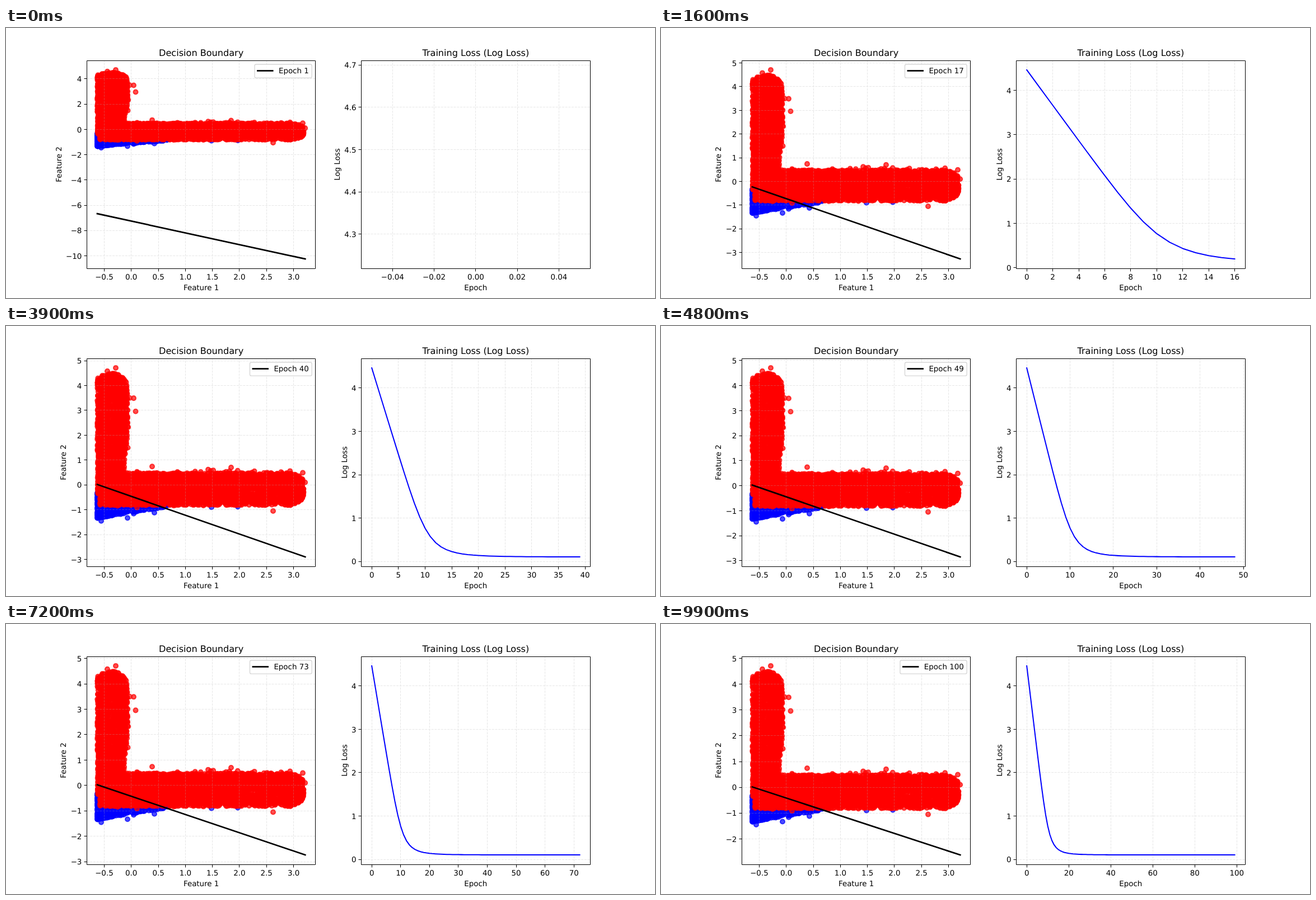
Recreate the animation shown at these times as an HTML page with a canvas. Size 1159 px wide and 483 px high, loop 10000 ms.

```html
<!DOCTYPE html>
<html lang="en">
<head>
<meta charset="utf-8">
<title>Decision boundary training</title>
<style>
  html, body { margin: 0; width: 100%; height: 100%; overflow: hidden; background: #fff; }
  canvas, svg { position: absolute; left: 0; top: 0; width: 1159px; height: 483px; }
  text { font-family: "DejaVu Sans", sans-serif; font-size: 13.417px; text-rendering: geometricPrecision; }
  .title { font-size: 16.1px; }
</style>
</head>
<body>
<canvas id="dots" width="1159" height="483"></canvas>
<svg id="plot" viewBox="0 0 1159 483"></svg>
<script>
const STEP = 100, EPOCHS = 100;
const PT = 1.3417, EM = 10 * PT;
const LEFT = 144.4, W = 408.5, TOP = 58, H = 372, BOTTOM = TOP + H;
const X_MIN = -0.629, X_MAX = 3.215, Y_MIN = -1.46, Y_MAX = 4.71;
const svg = document.getElementById('plot');
const ctx = document.getElementById('dots').getContext('2d');

// Descent at a constant rate that fades as the loss nears its floor
const LOSS_START = 4.465, LOSS_FLOOR = .102, RATE = .4, SUB = 10;
const losses = [LOSS_START];
for (let k = 1, loss = LOSS_START; k < EPOCHS; k++) {
  for (let i = 0; i < SUB; i++)
    loss -= RATE / SUB * (1 - Math.exp(-1.4 * (loss - LOSS_FLOOR) ** 1.3));
  losses.push(loss);
}

// Boundary y = offset + slope * x: a fast decay plus a slow drift
const decay = (k, tau) => Math.exp(-k / tau);
const offset = k => -.41 - 6.645 * decay(k, 4.6) - .2 * decay(k, 28);
const slope = k => -.805 + .0012 * k - .126 * decay(k, 5);

// Scatter points: stage x, data y
let seed = 20;
function rnd() {
  seed = (seed * 1664525 + 1013904223) % 4294967296;
  return seed / 4294967296;
}
const EDGE = 163.2;
const tail = size => rnd() < .06 ? size * rnd() : 0;

function makeBlue() {
  const pts = [[367, -.9], [414, -.88], [265, -1.12], [170, -1.45], [228, -1.16], [217, -1.33]];
  for (let i = 0; i < 900; i++) {
    const dx = 125 * rnd() ** 2.1;
    const low = -1.34 + .0037 * dx;
    pts.push([EDGE + dx, low + (-.3 - low) * rnd() ** 1.2]);
  }
  return pts;
}

function makeRed() {
  const pts = [[196, 4.71], [181, 4.58], [228, 3.49], [231.5, 2.96], [261, .74], [361, .62],
    [402, .7], [530, .49], [534.2, .1], [477, -1.05]];
  // upright arm
  for (let i = 0; i < 1700; i++) {
    const y = -.2 + 4.7 * rnd();
    const right = 217.5 - 1.3 * (y - 2.9) ** 2;
    const x = EDGE + (right - EDGE) * rnd() ** 1.1 + tail(8);
    if (y < 4.5 - .25 * ((x - 187) / 25) ** 2) pts.push([x, y]);
  }
  // level arm, tapered at its right end
  for (let i = 0; i < 3400; i++) {
    const x = EDGE + 368.5 * rnd();
    const t = Math.max(0, (x - 503) / 30);
    const s = 2 * rnd() - 1;
    const y = -.17 + (s * .65 + Math.sign(s) * tail(.13)) * (1 - .5 * t * t);
    if (y > -.3 - (x - EDGE) * .1) pts.push([x, y]);
  }
  return pts;
}
const clouds = [['#00f', makeBlue()], ['#f00', makeRed()]];

function drawDots(py) {
  ctx.clearRect(0, 0, 1159, 483);
  ctx.globalAlpha = .7;
  ctx.lineWidth = 1.5 * PT;
  for (const [color, pts] of clouds) {
    ctx.fillStyle = ctx.strokeStyle = color;
    for (const [x, y] of pts) {
      ctx.beginPath();
      ctx.arc(x, py(y), 3 * PT, 0, 7);
      ctx.fill();
      ctx.stroke();
    }
  }
}

const text = (x, y, s, anchor = 'middle', extra = '') =>
  `<text x="${x}" y="${y}" text-anchor="${anchor}" ${extra}>${s}</text>`;
const line = (d, color, width, extra = '') =>
  `<path d="${d}" fill="none" stroke="${color}" stroke-width="${width}" ${extra}/>`;
const snap = v => Math.floor(v) + .5;
const textWidth = s =>
  EM * [...s].reduce((w, c) => w + (c === '.' ? .318 : c === '−' ? .838 : .636), 0);

function ticks(lo, hi) {
  const raw = (hi - lo) / 9;
  const mag = 10 ** Math.floor(Math.log10(raw));
  const step = +([1, 2, 2.5, 5, 10].find(s => s * mag >= raw - 1e-9) * mag).toFixed(6);
  const digits = (String(step).split('.')[1] || '').length;
  const list = [];
  for (let i = Math.ceil(lo / step - 1e-9); i <= hi / step + 1e-9; i++) {
    const label = (i < 0 ? '−' : '') + Math.abs(i * step).toFixed(digits);
    list.push([i * step, label]);
  }
  return list;
}

const scale = (lo, hi, a, b) => v => a + (v - lo) / (hi - lo) * (b - a);
const pad = (lo, hi) => [lo - .05 * (hi - lo), hi + .05 * (hi - lo)];

function panel(left, xLim, yLim, title, xName, yName, content) {
  const px = scale(...xLim, left, left + W), py = scale(...yLim, BOTTOM, TOP);
  const x0 = snap(left), x1 = snap(left + W), y0 = snap(TOP), y1 = snap(BOTTOM);
  const mid = left + W / 2;
  let grid = '', marks = '', labels = '', wide = 0;
  for (const [v, s] of ticks(...xLim)) {
    const x = snap(px(v));
    grid += `M${x} ${y1}V${y0}`;
    marks += `M${x} ${y1}v5`;
    labels += text(px(v), 450.2, s);
  }
  for (const [v, s] of ticks(...yLim)) {
    const y = snap(py(v));
    grid += `M${x0} ${y}H${x1}`;
    marks += `M${x0} ${y}h-5`;
    labels += text(left - 9, py(v) + 5.2, s, 'end');
    wide = Math.max(wide, textWidth(s));
  }
  const yx = left - wide - 17.5, my = TOP + H / 2;
  return line(grid, '#b0b0b0', 1.07, 'stroke-opacity=".3" stroke-dasharray="3.97 1.72"')
    + content(px, py)
    + line(marks + `M${x0} ${y0}H${x1}V${y1}H${x0}Z`, '#000', 1)
    + labels
    + text(mid, 50, title, 'middle', 'class="title"')
    + text(mid, 468.7, xName)
    + text(0, 0, yName, 'middle', `transform="translate(${yx} ${my}) rotate(-90)"`);
}

function legend(epoch) {
  const w = EM * (3.381 + 3.6) + textWidth(String(epoch)), x = LEFT + W - 6.7 - w;
  return `<rect x="${x}" y="65" width="${w}" height="24.2" rx="2.7" fill="#fff"`
    + ` fill-opacity=".8" stroke="#ccc" stroke-opacity=".8" stroke-width="1.34"/>`
    + line(`M${x + .4 * EM} 76.5h${2 * EM}`, '#000', 2 * PT, 'stroke-linecap="square"')
    + text(x + 3.2 * EM, 80.6, 'Epoch ' + epoch, 'start');
}

function draw(k) {
  const boundaryY = x => offset(k) + slope(k) * x;
  const yLim = pad(Math.min(boundaryY(X_MAX), Y_MIN), Y_MAX);
  drawDots(scale(...yLim, BOTTOM, TOP));

  const boundary = (px, py) =>
    line(`M${px(X_MIN)} ${py(boundaryY(X_MIN))}L${px(X_MAX)} ${py(boundaryY(X_MAX))}`,
      '#000', 2 * PT, 'stroke-linecap="square"')
    + legend(k + 1);

  const lossX = k ? pad(0, k) : [-.055, .055];
  const lossY = k ? pad(losses[k], LOSS_START) : pad(LOSS_START * .95, LOSS_START * 1.05);
  const history = (px, py) => k
    ? line('M' + losses.slice(0, k + 1).map((v, i) => px(i) + ' ' + py(v)).join('L'),
        '#00f', 1.5 * PT, 'stroke-linecap="square" stroke-linejoin="round"')
    : '';

  svg.innerHTML =
    panel(LEFT, pad(X_MIN, X_MAX), yLim, 'Decision Boundary', 'Feature 1', 'Feature 2', boundary)
    + panel(LEFT + 1.2 * W, lossX, lossY, 'Training Loss (Log Loss)', 'Epoch', 'Log Loss', history);
}

let shown = -1;
function tick() {
  const k = Math.floor(performance.now() / STEP) % EPOCHS;
  if (k !== shown) draw(shown = k);
  requestAnimationFrame(tick);
}
tick();
</script>
</body>
</html>
```
